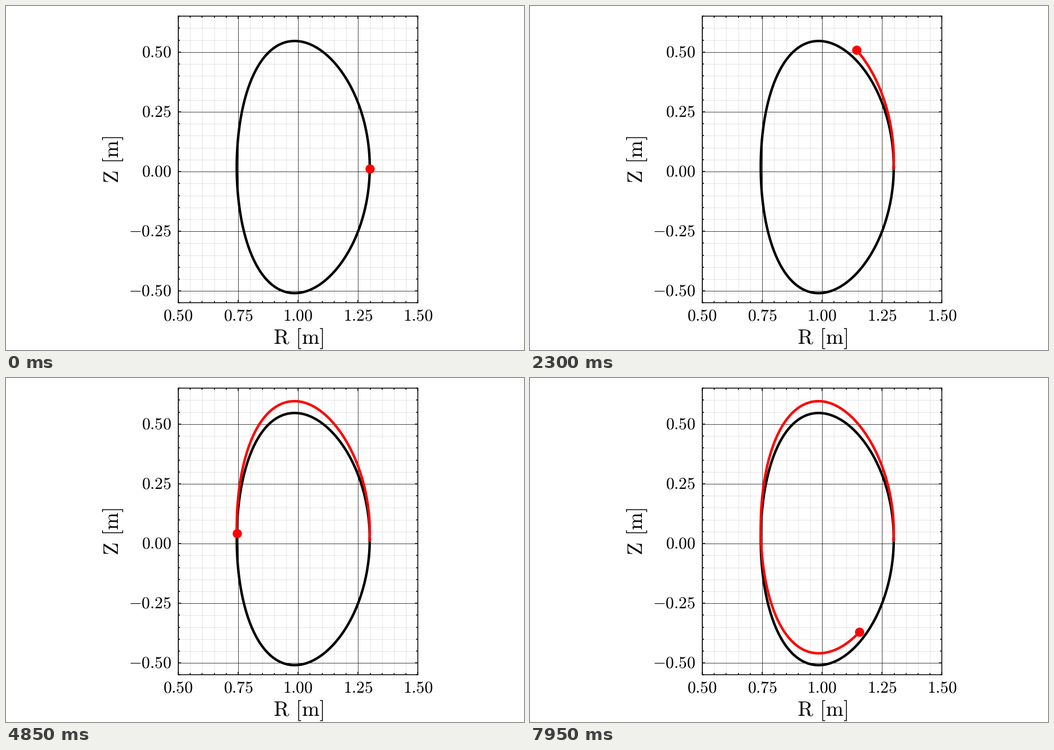
Animation, 917 px wide and 611 px high, one loop 8000 ms. Source, as a matplotlib script:

```python
import numpy as np
import matplotlib.pyplot as plt
from matplotlib.animation import FuncAnimation
from matplotlib.ticker import MultipleLocator

W, H, DPI = 917, 611, 64
PX = 72 / DPI  # points per pixel
FRAMES, STEP = 160, 50

plt.rcParams.update({"mathtext.fontset": "cm", "text.hinting": "none"})

# Plasma boundary: centre, half width, half height, triangularity
R0, Z0, A, B, DELTA = 1.0212, 0.0188, 0.2774, 0.5277, 0.13

# Poloidal angle of the particle at some times (s)
TIMES = np.array([0, .85, 1.5, 1.7, 2.3, 2.55, 3.4, 3.8, 4.25,
                  5.1, 5.9, 6.8, 7.15, 7.65, 7.95])
ANGLES = np.array([-.0715, .183, .4405, .549, 1.0063, 1.2965, 2.4376, 2.7208,
                   2.9507, 3.286, 3.6269, 4.2865, 4.6176, 5.0577, 5.3255])
SLOPES = np.gradient(ANGLES, TIMES)


def angle_at(t):
    """Cubic Hermite interpolation of the poloidal angle."""
    i = int(np.clip(np.searchsorted(TIMES, t) - 1, 0, len(TIMES) - 2))
    h = TIMES[i + 1] - TIMES[i]
    u = (t - TIMES[i]) / h
    return ((2 * u**3 - 3 * u**2 + 1) * ANGLES[i]
            + (u**3 - 2 * u**2 + u) * h * SLOPES[i]
            + (3 * u**2 - 2 * u**3) * ANGLES[i + 1]
            + (u**3 - u**2) * h * SLOPES[i + 1])


def surface(th):
    return R0 + A * np.cos(th + DELTA * np.sin(th)), Z0 + B * np.sin(th)


def orbit(th):
    """Boundary drifted upwards, less so on the outer side."""
    r, z = surface(th)
    return r, z + 0.0495 - 0.0188 * np.maximum(np.cos(th), 0) ** 2


fig = plt.figure(figsize=(W / DPI, H / DPI), dpi=DPI, facecolor="white")
LEFT, TOP, SCALE = 305, 18.2, 424.4
ax = fig.add_axes([LEFT / W, 1 - (TOP + 1.2 * SCALE) / H,
                   SCALE / W, 1.2 * SCALE / H])
ax.set(xlim=(0.5, 1.5), ylim=(-0.55, 0.65))
for axis in (ax.xaxis, ax.yaxis):
    axis.set_major_locator(MultipleLocator(0.25))
    axis.set_minor_locator(MultipleLocator(0.05))
ax.set_axisbelow(True)
ax.grid(which="major", color="black", alpha=0.8, lw=0.9 * PX)
ax.grid(which="minor", color="black", alpha=0.13, lw=0.8 * PX)
ticks = dict(direction="in", top=True, right=True,
             labelbottom=False, labelleft=False, width=1.5 * PX)
ax.tick_params(which="major", length=5 * PX, **ticks)
ax.tick_params(which="minor", length=3 * PX, **ticks)
for spine in ax.spines.values():
    spine.set_linewidth(1.5 * PX)


def label(x, y, s, size, **kw):
    fig.text(x / W, 1 - y / H, f"${s}$", fontsize=size * PX,
             va="baseline", **kw)


for r in np.arange(0.5, 1.51, 0.25):
    label(LEFT + (r - 0.5) * SCALE, 559.8, f"{r:.2f}", 29.6, ha="center")
for z in np.arange(-0.5, 0.51, 0.25):
    label(293, TOP + (0.65 - z) * SCALE + 9.2, f"{z:.2f}", 29.6, ha="right")
label(517.2, 600.5, r"\mathrm{R\hspace{0.38}[m]}", 37.2, ha="center")
label(199.3, 272.8, r"\mathrm{Z\hspace{0.38}[m]}", 37.2, ha="center",
      rotation=90, rotation_mode="anchor")

ax.plot(*surface(np.linspace(0, 2 * np.pi, 400)), color="black",
        lw=4.4 * PX, zorder=3)
trail, = ax.plot([], [], color="red", lw=4.4 * PX, zorder=4)
dot, = ax.plot([], [], "o", color="red", ms=16.4 * PX, mew=0, zorder=5)


def update(frame):
    th = angle_at(frame * STEP / 1000)
    trail.set_data(*orbit(np.linspace(ANGLES[0], th, 2 + 2 * frame)))
    r, z = orbit(th)
    dot.set_data([r], [z])
    return trail, dot


anim = FuncAnimation(fig, update, frames=FRAMES, interval=STEP,
                     init_func=lambda: update(0), repeat=True, blit=False)
plt.show()
```
